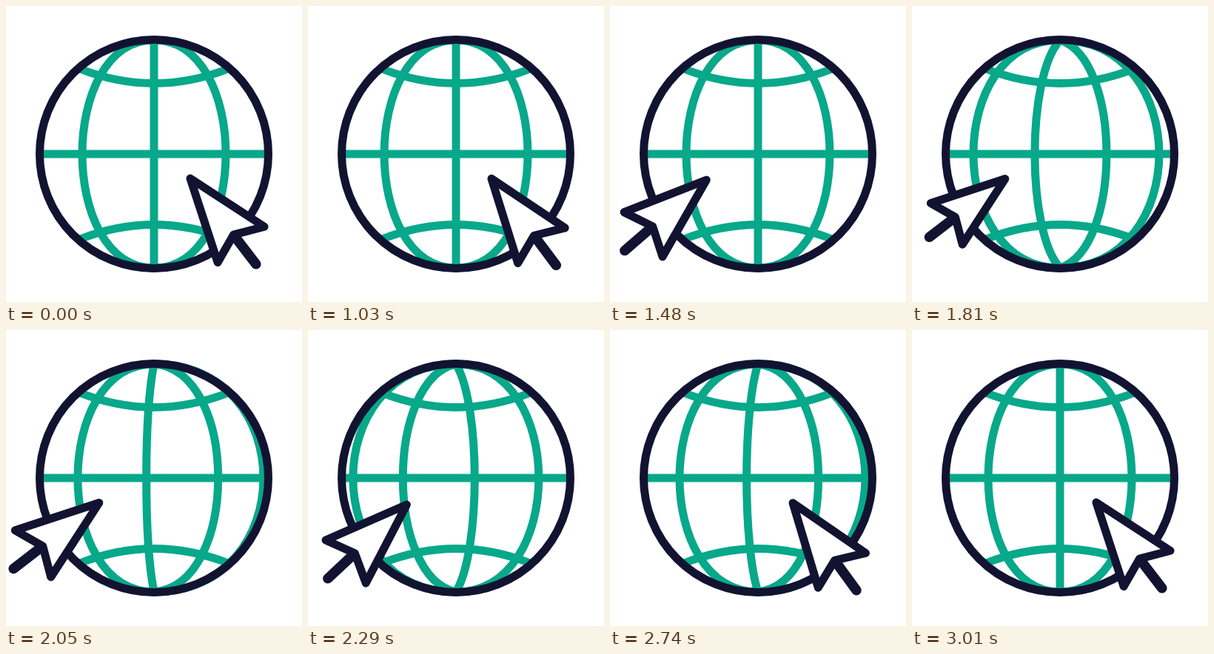
An HTML page that plays this animation: 400 px wide and 400 px high, repeating every 3.04 s.

```html
<!DOCTYPE html>
<html lang="en">
<head>
<meta charset="utf-8">
<title>Globe and pointer</title>
<style>
  html, body { margin: 0; width: 100%; height: 100%; overflow: hidden; background: #fff; }
  svg { display: block; width: 100vw; height: 100vh; }
  .lines { fill: none; stroke: #08a88a; stroke-width: 11; }
  .ink { fill: none; stroke: #121331; stroke-width: 11; stroke-linecap: round; stroke-linejoin: round; }
  .ink path { vector-effect: non-scaling-stroke; }
  .ink .head { fill: #fff; }
  .ink .tail { stroke-width: 13.5; }
</style>
</head>
<body>
<svg viewBox="0 0 400 400">
  <g class="lines">
    <path d="M46 200H354M100 85Q200 124 300 85M100 315Q200 276 300 315"/>
    <path id="meridians"/>
  </g>
  <g class="ink">
    <circle cx="200" cy="200" r="154.5"/>
    <g id="pointer">
      <path class="head" d="M0 0L39.7 112.7L0 96L-39.7 112.7Z"/>
      <path class="tail" d="M0 99V146"/>
    </g>
  </g>
</svg>
<script>
  const LOOP = 3040, START = 1000, STEP = 30;
  const STOPS = [-154, -97, 0, 97, 154];
  const TURNS = 5;       // meridian spacings travelled per loop
  const REACH = 1.035;   // how far the pointer swings to the left
  const meridians = document.getElementById('meridians');
  const pointer = document.getElementById('pointer');

  // Cubic bezier easing from (0,0) to (1,1) with handles (x1,0) and (x2,1).
  function ease(t, from, to, x1, x2) {
    const x = Math.min(1, Math.max(0, (t - from) / (to - from)));
    let lo = 0, hi = 1;
    for (let i = 0; i < 24; i++) {
      const s = (lo + hi) / 2, r = 1 - s;
      if (3 * x1 * s * r * r + 3 * x2 * s * s * r + s * s * s < x) lo = s;
      else hi = s;
    }
    return x === 1 ? 1 : lo * lo * (3 - 2 * lo);
  }

  // Pole to pole through x at the equator; more pointed near the middle.
  function meridian(x) {
    const lift = 77 * Math.max(0, 1 - Math.abs(x) / 97);
    const bend = 200 + x * 4 / 3;
    return `M200 46C${bend} ${46 + lift} ${bend} ${354 - lift} 200 354`;
  }

  function drawGlobe(t) {
    const p = TURNS * ease(t, 1512, 2941, 0.33, 0.534) % 1;
    const still = p < 0.0005 || p > 0.9995;
    meridians.setAttribute('d', still
      ? STOPS.slice(1, 4).map(meridian).join('')
      : STOPS.slice(0, 4).map((x, i) => meridian(x + (STOPS[i + 1] - x) * p)).join(''));
  }

  function drawPointer(t) {
    const u = REACH * (ease(t, 1000, 1590, 0.33, 0.4) - ease(t, 2203, 2783, 0.33, 0.67));
    const press = ease(t, 1630, 1810, 0.33, 0.67) - ease(t, 1810, 1990, 0.33, 0.67);
    const x = 249 - 119 * u;
    const y = 233 + 2 * u + 41 * u * (1 - u);
    const angle = -37.5 + 86.9 * u;
    pointer.setAttribute('transform',
      `translate(${x} ${y}) rotate(${angle}) scale(${1 - 0.115 * press})`);
  }

  function draw(now) {
    const ms = now % LOOP;
    const t = START + Math.max(0, Math.floor((ms - START) / STEP)) * STEP;
    drawGlobe(t);
    drawPointer(t);
  }

  const begin = performance.now();
  function tick() {
    draw(performance.now() - begin);
    requestAnimationFrame(tick);
  }
  tick();
</script>
</body>
</html>
```
